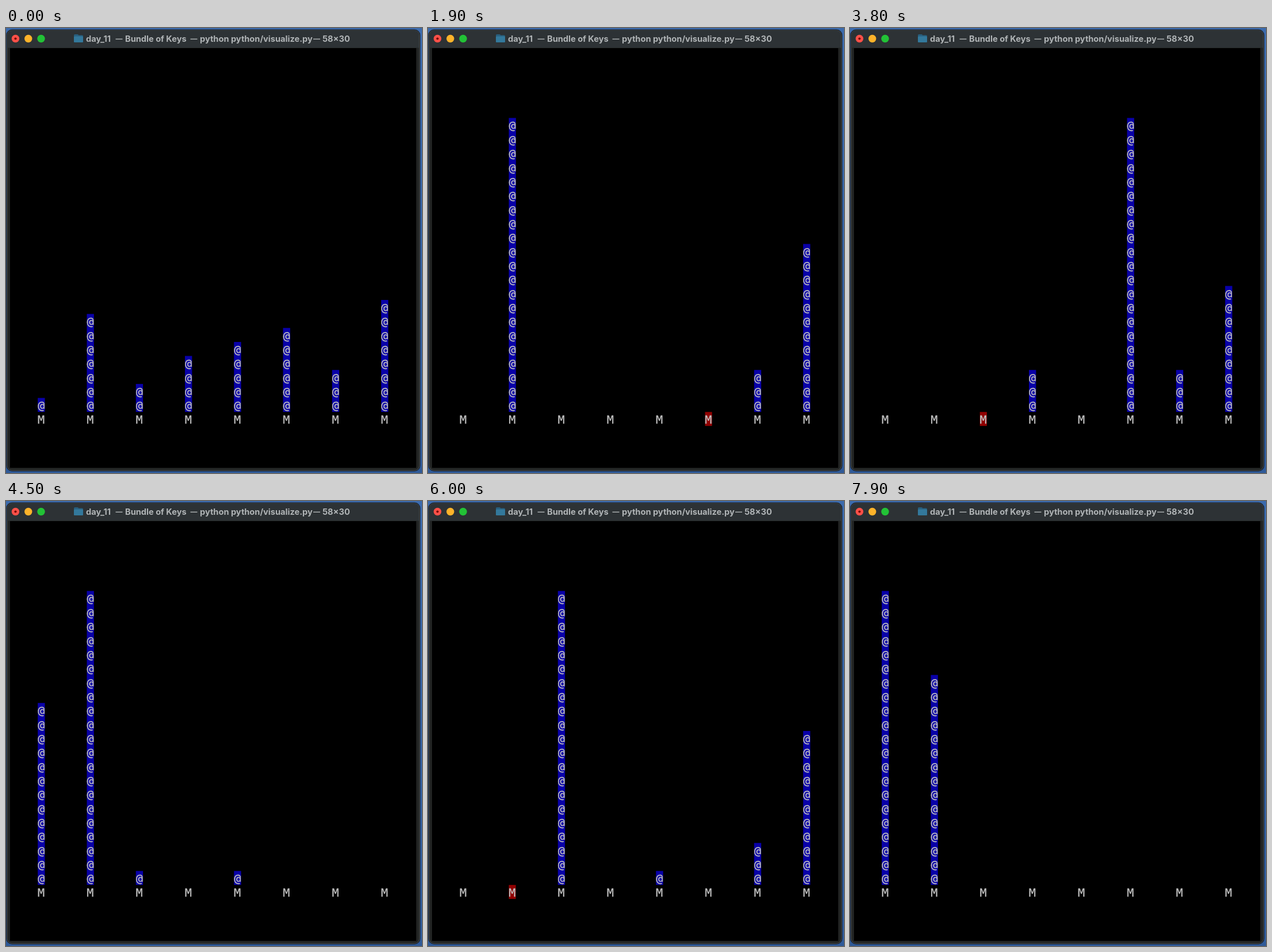
Write an HTML page with a canvas that moves like this. It is 723 px wide and 774 px high and loops after 8 s.

```html
<!DOCTYPE html>
<html lang="en">
<head>
<meta charset="utf-8">
<title>Terminal</title>
<style>
  html, body { margin: 0; width: 100%; height: 100%; overflow: hidden; background: #335f9f; }
  canvas { display: block; }
</style>
</head>
<body>
<canvas id="stage" width="723" height="774"></canvas>
<script>
const ctx = document.getElementById('stage').getContext('2d');
const LOOP = 8000, TICK = 100;

// Timing in ticks: first turn, one turn, one whole round with its pause.
const START = 1.3, TURN = 1.09, ROUND = 11.4;

// Each monkey: starting items, operation, divisor, target if divisible, target if not.
const monkeys = [
  [[57], n => n * 13, 11, 3, 2],
  [[58, 93, 88, 81, 72, 73, 65], n => n + 2, 7, 6, 7],
  [[65, 95], n => n + 6, 13, 3, 5],
  [[58, 80, 81, 83], n => n * n, 5, 4, 5],
  [[58, 89, 90, 96, 55], n => n + 3, 3, 1, 7],
  [[66, 73, 87, 58, 62, 67], n => n * 7, 17, 4, 1],
  [[85, 55, 89], n => n + 4, 2, 2, 0],
  [[73, 80, 54, 94, 90, 52, 69, 58], n => n + 7, 19, 6, 0]
];

// Item counts after every turn; entry 0 is the starting position.
function simulate(rounds) {
  const hands = monkeys.map(m => [...m[0]]);
  const counts = () => hands.map(h => h.length);
  const states = [counts()];
  for (let r = 0; r < rounds; r++) {
    monkeys.forEach(([, op, divisor, yes, no], i) => {
      for (const item of hands[i].splice(0)) {
        const worry = Math.floor(op(item) / 3);
        hands[worry % divisor ? no : yes].push(worry);
      }
      states.push(counts());
    });
  }
  return states;
}
const states = simulate(8);

function stateAt(tick) {
  const t = tick - START;
  if (t < 0) return { counts: states[0], active: -1 };
  const round = Math.floor(t / ROUND);
  const turn = Math.floor((t - round * ROUND) / TURN);
  return {
    counts: states[round * 8 + Math.min(turn, 7) + 1],
    active: turn < 8 ? turn : -1
  };
}

function rect(x, y, w, h, color) {
  ctx.fillStyle = color;
  ctx.fillRect(x, y, w, h);
}

function disc(x, y, r, color) {
  ctx.fillStyle = color;
  ctx.beginPath();
  ctx.arc(x, y, r, 0, 7);
  ctx.fill();
}

function rounded(x, y, w, h, r, color) {
  ctx.fillStyle = color;
  ctx.beginPath();
  ctx.roundRect(x, y, w, h, r);
  ctx.fill();
}

const desktop = ctx.createLinearGradient(0, 0, 0, 774);
desktop.addColorStop(0, '#3c6bad');
desktop.addColorStop(1, '#2f5a98');

function drawWindow() {
  rect(0, 0, 723, 774, desktop);
  rounded(0.5, 2.5, 719.5, 768.5, 10, '#10151c');
  rounded(1.5, 3.5, 717.5, 766.5, 9, '#4d5254');
  rounded(2.5, 4.5, 715.5, 764.5, 8, '#222423');
  rounded(2.5, 4.5, 715.5, 30, [8, 8, 0, 0], '#2d3235');
  rect(7, 35, 706, 730, '#000');

  disc(16.5, 18.5, 6.7, '#ff5048');
  disc(16.5, 18.5, 2.1, '#780806');
  disc(38.8, 18.5, 6.7, '#fdb32a');
  disc(61, 18.5, 6.7, '#22c236');

  rounded(118, 11, 8, 6, 1.5, '#285f7e');
  rounded(118, 12.5, 16, 12.5, 1.5, '#285f7e');
  rounded(118, 14.5, 16, 10.5, 1.5, '#33789b');

  ctx.fillStyle = '#b0b4b6';
  ctx.font = '700 14.6px Inter, "Open Sans", sans-serif';
  ctx.textAlign = 'left';
  ctx.fillText('day_11', 139, 23.5);
  ctx.fillText('Bundle of Keys', 207, 23.5);
  ctx.fillText('python python/visualize.py', 337, 23.5);
  ctx.fillText('58×30', 550, 23.5);
  ctx.font = '700 12px Inter, "Open Sans", sans-serif';
  ctx.textAlign = 'center';
  for (const x of [196.5, 326.5, 540]) ctx.fillText('—', x, 23);
}

const CELL_W = 12.18, CELL_H = 24.35, FLOOR = 667.8;

function glyph(text, x, top) {
  ctx.fillStyle = ctx.strokeStyle = '#bfbfbf';
  ctx.lineWidth = 0.3;
  ctx.fillText(text, x + CELL_W / 2, top + 20);
  ctx.strokeText(text, x + CELL_W / 2, top + 20);
}

function drawPiles({ counts, active }) {
  ctx.font = '20.2px "DejaVu Sans Mono", monospace';
  ctx.textAlign = 'center';
  counts.forEach((count, i) => {
    const x = 55.2 + i * 7 * CELL_W, height = count * CELL_H;
    rect(x, FLOOR - height, CELL_W + 0.2, height, '#0900a8');
    for (let k = 1; k <= count; k++) glyph('@', x, FLOOR - k * CELL_H);
    if (i === active) rect(x, FLOOR, CELL_W, CELL_H, '#900000');
    glyph('M', x - 0.3, FLOOR);
  });
}

function frame() {
  const tick = Math.floor(performance.now() % LOOP / TICK);
  drawWindow();
  drawPiles(stateAt(tick));
  requestAnimationFrame(frame);
}
frame();
</script>
</body>
</html>
```
